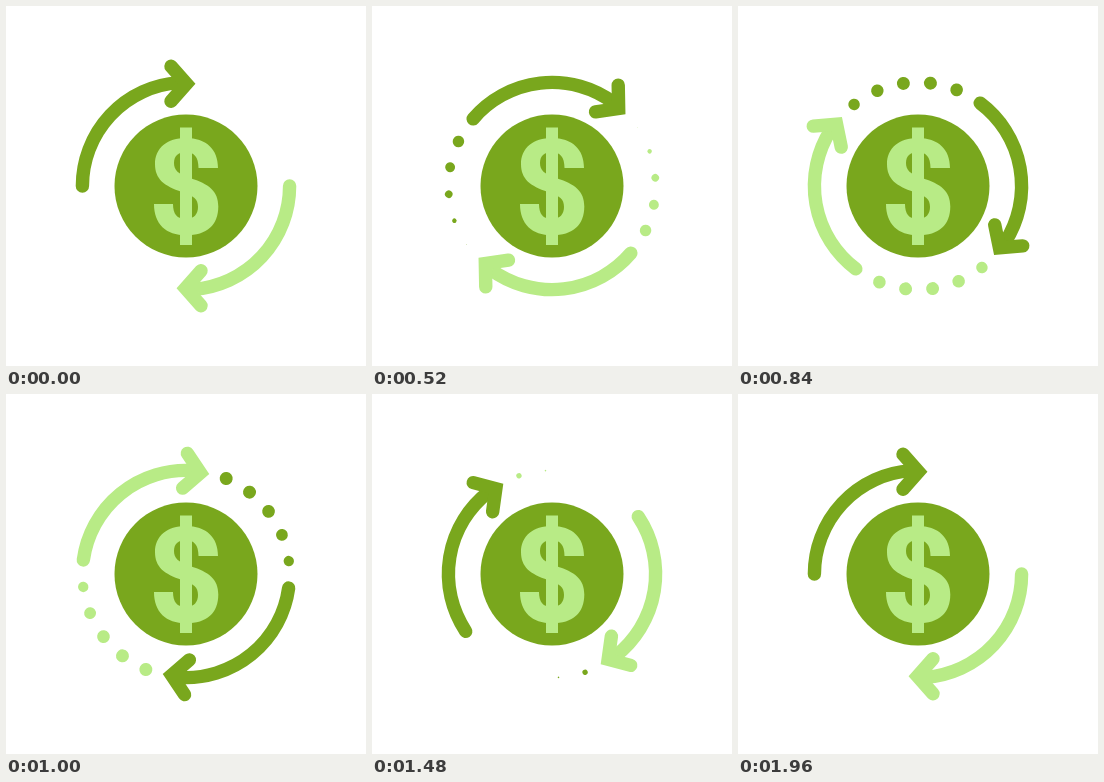
These frames come from a looping animation (360 by 360 pixels, 3000 ms). An HTML page with a canvas:

```html
<!DOCTYPE html>
<html lang="en">
<head>
<meta charset="utf-8">
<title>Money cycle</title>
<style>
  html, body { margin: 0; width: 100%; height: 100%; overflow: hidden; background: #fff; }
  canvas { display: block; width: 360px; height: 360px; }
</style>
</head>
<body>
<canvas id="stage"></canvas>
<script>
const SIZE = 360, LOOP = 3000, STEP = 40, SPIN = 1960;
const ORBIT = 103.6, WEIGHT = 13.4;
const DARK = '#79a71d', LIGHT = '#b8eb86';
const RAD = Math.PI / 180;

const canvas = document.getElementById('stage');
const ctx = canvas.getContext('2d');
const ratio = window.devicePixelRatio || 1;
canvas.width = canvas.height = SIZE * ratio;

const dollar = new Path2D(
  'M212 162H192.5C192.5 151 188 146 180 146C172 146 168 150 168 157' +
  'C168 164 172 168 184 172C203 178 212.3 185 212.3 200.5' +
  'C212.3 219 201 229.3 180 229.3C160 229.3 148 218 148 198H167' +
  'C167 208 171 213 180 213C188 213 192 208 192 201' +
  'C192 193 188 190 176 186C158 180 149 173 149 158' +
  'C149 142 161 132 180 132C200 132 212 143 212 162Z');

// Symmetric cubic Bézier easing (.53, 0, .47, 1), solved by bisection.
function ease(x) {
  const a = 0.53;
  let lo = 0, hi = 1, s = 0.5;
  for (let i = 0; i < 30; i++) {
    s = (lo + hi) / 2;
    const r = 1 - s;
    const bx = 3 * r * r * s * a + 3 * r * s * s * (1 - a) + s * s * s;
    if (bx < x) lo = s; else hi = s;
  }
  return s * s * (3 - 2 * s);
}

// Each dot swells and shrinks once, 80 ms after the one before it.
function dotRadius(t, i) {
  const v = 1 - Math.abs(t - i * 80 - 730) / 540;
  return v > 0 ? 6.5 * (1 - Math.pow(1 - v, 2.3)) : 0;
}

function disc(x, y, r) {
  ctx.beginPath();
  ctx.arc(x, y, r, 0, Math.PI * 2);
  ctx.fill();
}

// Arrow around the centre, tail pointing left at zero degrees.
function arrow(t, degrees, color) {
  ctx.save();
  ctx.translate(180, 180);
  ctx.rotate(degrees * RAD);
  ctx.fillStyle = ctx.strokeStyle = color;
  ctx.lineWidth = WEIGHT;
  ctx.lineCap = 'round';
  ctx.lineJoin = 'miter';

  ctx.beginPath();
  ctx.arc(0, 0, ORBIT, 180 * RAD, 266 * RAD);
  ctx.stroke();

  ctx.beginPath();
  ctx.moveTo(-15, -119.7);
  ctx.lineTo(0.5, -102.2);
  ctx.lineTo(-15, -84.7);
  ctx.stroke();

  for (let i = 0; i < 5; i++) {
    const r = dotRadius(t, i);
    const angle = (180 - 15 * (i + 1)) * RAD;
    if (r > 0) disc(ORBIT * Math.cos(angle), ORBIT * Math.sin(angle), r);
  }
  ctx.restore();
}

function draw(t) {
  ctx.setTransform(ratio, 0, 0, ratio, 0, 0);
  ctx.fillStyle = '#fff';
  ctx.fillRect(0, 0, SIZE, SIZE);

  ctx.fillStyle = DARK;
  disc(180, 180, 71.5);
  ctx.fillStyle = LIGHT;
  ctx.fill(dollar);
  ctx.fillRect(174, 121.5, 12, 117.5);

  const turn = t < SPIN ? 360 * ease(t / SPIN) : 0;
  arrow(t, turn, DARK);
  arrow(t, turn + 180, LIGHT);
}

const start = performance.now();
function tick() {
  const t = (performance.now() - start) % LOOP;
  draw(Math.floor(t / STEP) * STEP);
  requestAnimationFrame(tick);
}
tick();
</script>
</body>
</html>
```
